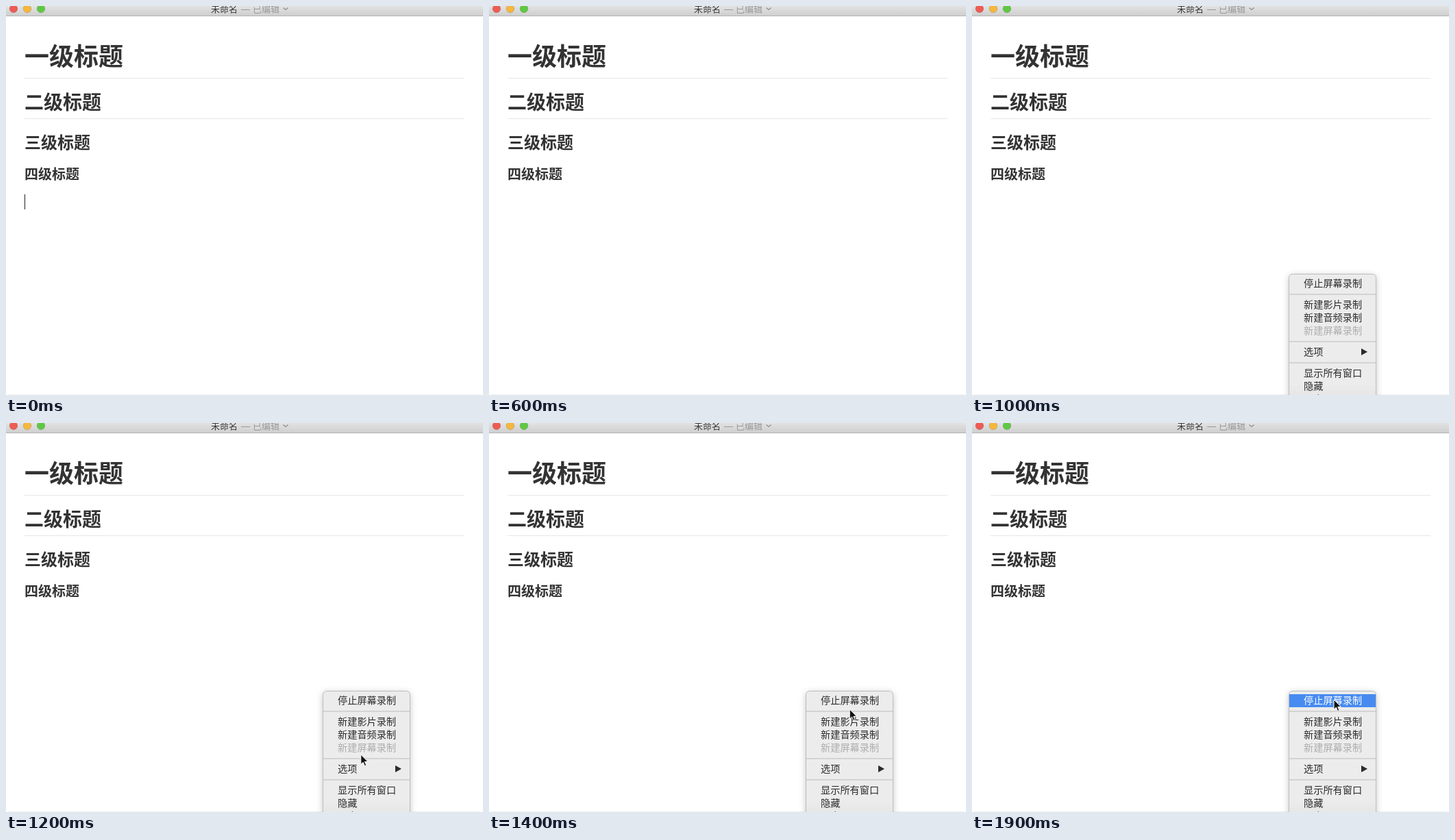
An HTML page that plays this animation: 696x568 px, repeating every 2 s.

```html
<!DOCTYPE html>
<html lang="zh-CN">
<head>
<meta charset="utf-8">
<style>
html, body { margin: 0; width: 100%; height: 100%; overflow: hidden; background: #fff; }
svg { display: block; font-family: "Noto Sans CJK SC", "Noto Sans CJK", sans-serif; }
.head { font-weight: 600; fill: #333; }
.rule { fill: #e7e7e7; }
.title { font-size: 13px; }
#menu text { font-size: 14.2px; font-weight: 500; fill: #2b2b2b; }
#menu text.off { fill: #adadad; }
#menu text.on { fill: #fff; }
#box { filter: drop-shadow(0 2px 5px rgba(0, 0, 0, .22)); }
</style>
</head>
<body>
<svg width="696" height="568" viewBox="0 0 696 568">
  <defs>
    <linearGradient id="bar" x2="0" y2="1">
      <stop stop-color="#e2e2e2"/><stop offset="1" stop-color="#cfcfcf"/>
    </linearGradient>
    <linearGradient id="panel" x2="0" y2="1">
      <stop offset=".8" stop-color="#ececec"/><stop offset="1" stop-color="#dedede"/>
    </linearGradient>
  </defs>

  <rect width="696" height="14" fill="url(#bar)"/>
  <rect y="14" width="696" height="1" fill="#b4b4b4"/>
  <g stroke-opacity=".18" stroke="#000" stroke-width=".8">
    <circle cx="11" cy="4" r="5.8" fill="#ee5b54"/>
    <circle cx="31" cy="4" r="5.8" fill="#f6b73d"/>
    <circle cx="51" cy="4" r="5.8" fill="#5fc843"/>
  </g>
  <g class="title">
    <text x="299" y="9" fill="#3a3a3a">未命名</text>
    <rect x="343" y="5" width="13" height="1" fill="#989898"/>
    <text x="360" y="9" fill="#989898">已编辑</text>
  </g>
  <path d="M404.5 2.5L408 5.5L411.5 2.5" fill="none" stroke="#8c8c8c" stroke-width="1.2"/>

  <g class="head">
    <text x="27" y="87" font-size="36">一级标题</text>
    <text x="27" y="151" font-size="28">二级标题</text>
    <text x="27" y="208" font-size="24">三级标题</text>
    <text x="27" y="252.5" font-size="20">四级标题</text>
  </g>
  <rect class="rule" x="27" y="105" width="642" height="1"/>
  <rect class="rule" x="27" y="164" width="642" height="1"/>
  <rect x="3" y="567" width="690" height="1" fill="#f1f1f1"/>

  <rect id="caret" x="27" y="275" width="1" height="22" fill="#222"/>
  <rect id="tip" x="419.5" y="566" width="139" height="20" rx="4" fill="#c2c2c2" stroke="#dcdcdc"/>

  <g id="menu">
    <rect id="box" x="462.5" y="391.5" width="127" height="200" rx="5" fill="url(#panel)" stroke="#bdbdbd"/>
    <g fill="#d3d3d3">
      <rect x="463" y="420" width="126" height="2"/>
      <rect x="463" y="489" width="126" height="2"/>
      <rect x="463" y="520" width="126" height="2"/>
    </g>
    <rect id="glow" x="463" width="126" height="19" fill="#478bf1"/>
    <g id="items"></g>
    <path d="M568 500L577 505L568 510Z" fill="#2b2b2b"/>
  </g>

  <g id="beam" fill="none">
    <path id="beamPath" d="M-3 -7.5Q0 -7.5 0 -5.5Q0 -7.5 3 -7.5M0 -5.5V5.5M-3 7.5Q0 7.5 0 5.5Q0 7.5 3 7.5M-1.5 1.5H1.5" stroke="#222" stroke-width="1.1"/>
  </g>
  <path id="arrow" d="M0 0V14.3L3.3 11.2L5.6 16.6L8 15.6L5.7 10.4H10.3Z" fill="#111" stroke="#fff"/>
</svg>
<script>
const $ = id => document.getElementById(id);
const show = (id, on) => $(id).setAttribute("visibility", on ? "visible" : "hidden");
const move = (id, x, y) => $(id).setAttribute("transform", `translate(${x} ${y})`);

// label, vertical centre, disabled
const rows = [
  ["停止屏幕录制", 405], ["新建影片录制", 436], ["新建音频录制", 455],
  ["新建屏幕录制", 474, true], ["选项", 505], ["显示所有窗口", 536],
  ["隐藏", 555], ["退出", 574]
];
const labels = rows.map(([label, y, off]) => {
  const t = document.createElementNS("http://www.w3.org/2000/svg", "text");
  t.textContent = label;
  t.setAttribute("x", 484);
  t.setAttribute("y", y + 5);
  if (off) t.setAttribute("class", "off");
  $("items").append(t);
  return t;
});

function draw(time) {
  const t = Math.floor(time % 2000 / 100) * 100;

  show("caret", t < 500);
  show("beam", t >= 100 && t < 600);
  const b = Math.min(t / 500, 1) ** 2;
  move("beam", 348 + 70.5 * b + .5, 475 + 63.5 * b + .5);

  show("tip", t >= 700 && t < 1000);
  $("tip").setAttribute("opacity", t < 800 ? .5 : 1);

  const open = t >= 1000;
  show("menu", open);
  show("arrow", t > 1000);
  const left = 1 - Math.min(Math.max((t - 1000) / 500, 0), 1);
  const p = 1 - left ** 1.594;
  const y = 585 - 181 * p;
  move("arrow", 505 + 23 * p, y);

  const hit = t > 1000 ? rows.findIndex(([, c, off]) => !off && Math.abs(y - c + .5) <= 9.5) : -1;
  show("glow", hit >= 0);
  if (hit >= 0) $("glow").setAttribute("y", rows[hit][1] - 9);
  labels.forEach((el, i) => el.classList.toggle("on", i === hit));
}

const start = performance.now();
function loop() {
  draw(performance.now() - start);
  requestAnimationFrame(loop);
}
loop();
</script>
</body>
</html>
```
